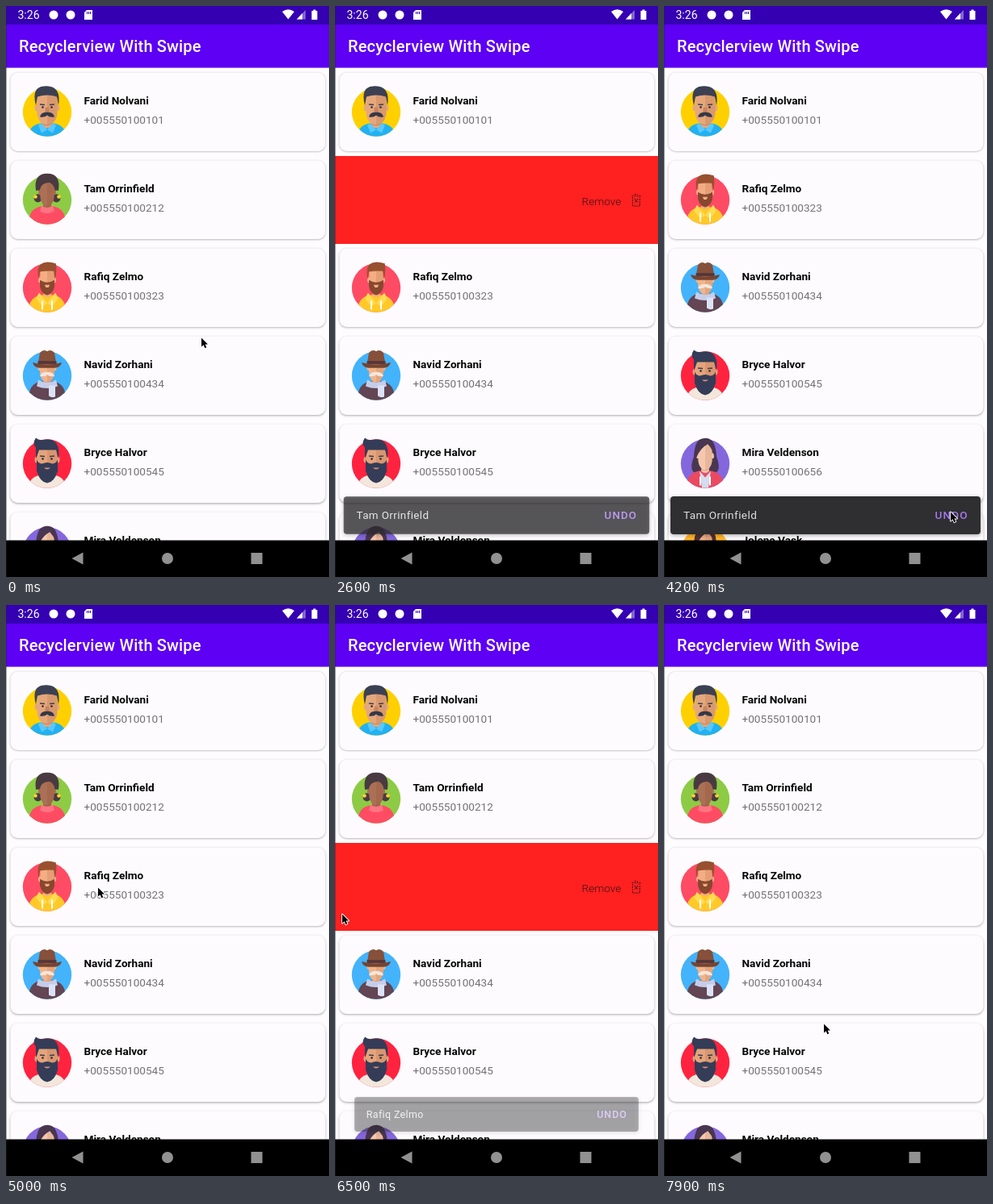
Write an HTML page with a canvas that moves like this. It is 400 by 708 pixels and loops after 8 s.

```html
<!DOCTYPE html>
<html lang="en">
<head>
<meta charset="utf-8">
<title>Swipe list</title>
<style>
html, body { margin: 0; width: 400px; height: 708px; overflow: hidden; background: #fefcff; }
canvas { display: block; }
</style>
</head>
<body>
<canvas id="stage" width="400" height="708"></canvas>
<script>
const ctx = document.getElementById('stage').getContext('2d');
const LOOP = 8000, STEP = 100, ROW = 109, TOP = 77, NAV = 662.5;

const clamp = v => Math.max(0, Math.min(1, v));
const smooth = v => { v = clamp(v); return v * v * (3 - 2 * v); };
const lerp = (a, b, v) => a + (b - a) * v;

function fill(color, d) {
  ctx.fillStyle = color;
  ctx.fill(new Path2D(d));
}
function line(color, width, d) {
  ctx.strokeStyle = color;
  ctx.lineWidth = width;
  ctx.stroke(new Path2D(d));
}
function rect(color, x, y, w, h) {
  ctx.fillStyle = color;
  ctx.fillRect(x, y, w, h);
}
function oval(color, x, y, rx, ry = rx) {
  ctx.fillStyle = color;
  ctx.beginPath();
  ctx.ellipse(x, y, rx, ry, 0, 0, Math.PI * 2);
  ctx.fill();
}
function round(color, x, y, w, h, r) {
  ctx.fillStyle = color;
  ctx.beginPath();
  ctx.roundRect(x, y, w, h, r);
  ctx.fill();
}
function text(str, x, y, color, weight = 400, size = 13.6, spacing = 0) {
  ctx.font = `${weight} ${size}px Roboto, sans-serif`;
  ctx.letterSpacing = spacing + 'px';
  ctx.fillStyle = color;
  ctx.fillText(str, x, y);
}
function shadow(color, blur, dy) {
  ctx.shadowColor = color;
  ctx.shadowBlur = blur;
  ctx.shadowOffsetY = dy;
}

// ---- avatars, drawn around the centre of a disc of radius 30 ----
function disc(color, body, neck = 14, behind) {
  oval(color, 0, 0, 30.2);
  ctx.save();
  ctx.beginPath();
  ctx.arc(0, 0, 30.2, 0, Math.PI * 2);
  ctx.clip();
  if (behind) behind();
  fill(body, `M-23 32Q-24 ${neck + 3}-8 ${neck}H8Q24 ${neck + 3} 23 32Z`);
  ctx.restore();
}
function head(skin, w = 12.5) {
  fill(skin, 'M-6 8H6V17Q0 23-6 17Z');
  fill('rgba(90,20,0,.2)', 'M-6 11H6V15Q0 19-6 15Z');
  oval(skin, -w - .5, -5, 2.5, 4);
  oval(skin, w + .5, -5, 2.5, 4);
  fill(skin, `M${-w}-23H${w}V3Q${w - 2} 15 0 16Q${2 - w} 15 ${-w} 3Z`);
  fill('rgba(110,30,0,.1)', `M0-23H${w}V3Q${w - 2} 15 0 16Z`);
}
function bust(paint) {
  ctx.save();
  ctx.translate(0, -5.5);
  ctx.scale(.82, .85);
  paint();
  ctx.restore();
}
function eyes(color) {
  oval('#2b2937', -5.5, -6, 1.3);
  oval('#2b2937', 5.5, -6, 1.3);
  line(color, 1.7, 'M-9-9.5L-3-9M3-9L9-9.5');
}
function strings() {
  line('#fff', 2, 'M-6 16V27M6 16V27');
}
function longHair(hair) {
  return () => fill(hair, 'M-13 11Q-20 8-14-9Q-13-32 0-32Q13-32 14-9Q20 8 13 11Z');
}
function fringe(hair) {
  fill(hair, 'M-14-1Q-19-31 1-31Q18-30 14-1Q13-13 4-22Q-7-17-14-1Z');
}

const faces = [
  () => {
    disc('#ffd000', '#22b1f2');
    head('#e5a77c');
    fill('#58c8fb', 'M-7 14L0 22L-7 26L-11 16ZM7 14L0 22L7 26L11 16Z');
    fill('#3c4053', 'M-14-8Q-20-31-4-32Q18-34 14-8L12-19Q0-23-12-19Z');
    eyes('#3c4053');
    fill('#c98560', 'M-2-6H2L3 0H-3Z');
    fill('#343848', 'M0 0Q8 0 9 6Q3 7 0 4Q-3 7-9 6Q-8 0 0 0Z');
  },
  () => {
    disc('#8dcb45', '#ff4c63', 8);
    bust(() => {
      oval('#493a42', -14, 4, 6);
      oval('#493a42', 14, 4, 6);
      head('#ab7056', 10.5);
      fill('#493a42', 'M-17-7Q-21-32 0-32Q21-32 17-7L11-8Q11-16 3-19Q-10-18-11-8Z');
    });
    oval('#ffd22d', -14.5, -4, 2.3);
    oval('#ffd22d', 14.5, -4, 2.3);
    fill('#ff7483', 'M-7 7Q0 12 7 7L9 14Q0 19-9 14Z');
  },
  () => {
    disc('#ff4b64', '#ffc928', 9);
    bust(() => {
      head('#f3ad82', 10.5);
      fill('#87482e', 'M-11-5Q0 2 11-5V5Q8 16 0 17Q-8 16-11 5Z');
      fill('#f3ad82', 'M-4 2H4L2 6H-2Z');
      fill('#98502f', 'M-13-6Q-16-23-10-28Q-2-34 13-29Q15-20 12-6L10-18Q0-19-11-17Z');
    });
    fill('#ffdc52', 'M-10 6L0 19L-6 23L-14 13ZM10 6L0 19L6 23L14 13Z');
    strings();
  },
  () => {
    disc('#43b3fb', '#634553', 7);
    bust(() => {
      head('#f0b48b', 11);
      fill('#f4e6dc', 'M0 1Q9 1 11 7Q3 8 0 5Q-3 8-11 7Q-9 1 0 1Z');
      fill('#86503a', 'M-14-10L-11-27Q-6-33 0-29Q6-33 11-27L14-10Z');
      fill('#53353a', 'M-14-15H14V-11H-14Z');
      fill('#754432', 'M-22-13Q0-7 22-13Q20-6 12-5H-12Q-20-6-22-13Z');
    });
    fill('#c5cdea', 'M-11 5Q0 12 11 5L13 13Q0 18-13 13Z');
    fill('#dce2f5', 'M2 12H10V26Q6 28 2 25Z');
  },
  () => {
    disc('#ff2340', '#f3e7dc');
    head('#e5a47b');
    fill('#343c57', 'M-13-5Q-11 0-6 0Q0-3 6 0Q11 0 13-5V9Q9 23 0 24Q-9 23-13 9Z');
    fill('#dc8e76', 'M-4 5H4Q0 9-4 5Z');
    fill('#343c57', 'M-14-6L-14-20Q-19-25-14-32Q-10-28-2-30Q17-32 14-6L11-17H-10Z');
    eyes('#343c57');
  },
  () => {
    disc('#8567dd', '#eb4961', 9, longHair('#493650'));
    bust(() => {
      head('#f6c7ad', 10.5);
      fringe('#493650');
    });
    fill('#d6dced', 'M-7 9L0 17L7 9L4 30H-4Z');
    strings();
  },
  () => {
    disc('#ffb629', '#31a6c9', 9, longHair('#503034'));
    bust(() => {
      head('#efb08a', 10.5);
      fringe('#503034');
    });
  }
];

const people = [
  ['Farid Nolvani', '+005550100101'],
  ['Tam Orrinfield', '+005550100212'],
  ['Rafiq Zelmo', '+005550100323'],
  ['Navid Zorhani', '+005550100434'],
  ['Bryce Halvor', '+005550100545'],
  ['Mira Veldenson', '+005550100656'],
  ['Jolene Vask', '+005550100767']
];

// ---- timeline ----
const swipes = [
  { row: 1, grab: 1500, release: 2200, out: 2490, undo: 4425 },
  { row: 2, grab: 5520, release: 6170, out: 6447, undo: 7325 }
];
const pointer = [
  [0, 242, 411], [500, 240, 390], [1000, 238, 320], [1400, 251, 242], [1500, 251, 242],
  [2200, -14, 252], [2700, -14, 300], [3400, 232, 389], [4150, 355, 627],
  [4500, 355, 627], [5000, 114, 350], [5400, 268, 354], [5520, 268, 354],
  [6170, 9, 383], [6600, 9, 383], [7150, 355, 627], [7400, 355, 627],
  [7900, 198, 519], [8000, 198, 519]
];

function pointerAt(t) {
  let i = 1;
  while (i < pointer.length - 1 && pointer[i][0] < t) i++;
  const [t0, x0, y0] = pointer[i - 1], [t1, x1, y1] = pointer[i];
  const v = smooth((t - t0) / (t1 - t0));
  return [lerp(x0, x1, v), lerp(y0, y1, v)];
}

function dragAt(s, t) {
  if (t < s.grab) return 0;
  const start = pointerAt(s.grab)[0];
  const held = pointerAt(Math.min(t, s.release))[0] - start;
  return lerp(held, -400, smooth((t - s.release) / (s.out - s.release)));
}

// ---- parts of the screen ----
function card(i, dx, y, alpha = 1) {
  if (alpha <= 0 || y > NAV) return;
  ctx.save();
  ctx.globalAlpha = alpha;
  ctx.translate(dx, y);
  const depth = y / NAV;
  shadow('rgba(0,0,0,.32)', 2.2 + depth, .3 + 1.2 * depth);
  round('#fdfbfe', 5.5, 5.5, 390, 97.5, 9);
  shadow('transparent', 0, 0);
  text(people[i][0], 96.5, 45, '#050505', 700);
  text(people[i][1], 96.5, 69, '#747274');
  ctx.translate(51, 54.5);
  faces[i]();
  ctx.restore();
}

function removePanel(dx, y) {
  ctx.save();
  ctx.beginPath();
  ctx.rect(400 + dx, y, -dx, ROW);
  ctx.clip();
  rect('#ff2020', 0, y, 400, ROW);
  text('Remove', 305.5, y + 61, '#401212', 300);
  ctx.translate(373, y + 55);
  ctx.setLineDash([2, 1]);
  line('#4a1616', 1.1, 'M-4.5-4V7H4.5V-4M-5.5-5.5H5.5M-2-7.5H2M-2-2L2 3M2-2L-2 3');
  ctx.restore();
}

function list(t) {
  const s = t < 5000 ? swipes[0] : swipes[1];
  const undone = t >= s.undo;
  const closed = undone
    ? 1 - smooth((t - s.undo) / 250)
    : smooth((t - s.out - 120) / 250);
  ctx.save();
  ctx.beginPath();
  ctx.rect(0, 0, 400, NAV + 1);
  ctx.clip();
  const y = TOP + s.row * ROW;
  const dx = undone ? 0 : dragAt(s, t);
  if (dx < 0 && t < s.out + 120) removePanel(dx, y);
  people.forEach((_, i) => {
    if (i === s.row) card(i, dx, y, undone ? clamp((t - s.undo - 250) / 120) : 1);
    else card(i, 0, TOP + (i - (i > s.row ? closed : 0)) * ROW);
  });
  snackbar(s, t);
  ctx.restore();
}

function snackbar(s, t) {
  const shown = clamp((t - s.out) / 150);
  const alpha = Math.min(shown, 1 - clamp((t - s.undo) / 75));
  if (alpha <= 0) return;
  const scale = .8 + .2 * (1 - (1 - shown) ** 2);
  // the bar fades as one layer, so its labels pale towards the page
  const pale = (...rgb) => `rgb(${rgb.map(c => lerp(252, c, alpha))})`;
  ctx.save();
  ctx.translate(200, 631.5);
  ctx.scale(scale, scale);
  ctx.globalAlpha = alpha;
  shadow('rgba(0,0,0,.32)', 5, 1.5);
  round('#2f2e30', -192, -23.5, 384, 47, 4);
  shadow('transparent', 0, 0);
  ctx.globalAlpha = 1;
  text(people[s.row][0], -176, 4.7, pale(223, 221, 224), 400, 13.6, .4);
  text('UNDO', 135.5, 4.7, pale(164, 119, 238), 500, 13.6, 1.1);
  ctx.restore();
}

function bars() {
  rect('#5d00f3', 0, 23, 400, 53.6);
  rect('#3400b2', 0, 0, 400, 23);
  text('Recyclerview With Swipe', 16, 57, '#fff', 500, 20, .16);
  text('3:26', 14.5, 16.3, '#fff', 400, 14);
  oval('#fff', 59, 11, 5.5);
  oval('#fff', 80, 11, 5.5);
  fill('#fff', 'M100 5H107V17H97V8Z');
  line('#3400b2', 1, 'M100.5 7V10M102.5 7V10M104.5 7V10');
  fill('#fff', 'M342 7Q349.5 1.5 357 7L349.5 16.5Z');
  fill('rgba(255,255,255,.4)', 'M371 5V16.5H360Z');
  fill('#fff', 'M367 9V16.5H360Z');
  fill('#fff', 'M378.5 6H380.5V4.5H383.5V6H385.5V17H378.5Z');

  rect('#000', 0, NAV, 400, 46);
  fill('#919191', 'M81.5 685L95.5 677.5V692.5Z');
  oval('#919191', 200, 685, 7);
  rect('#919191', 303.5, 678, 14, 14);
  rect('rgba(45,38,50,.5)', 0, 0, .8, 708);
}

function cursor(t) {
  const [x, y] = pointerAt(t);
  ctx.save();
  ctx.translate(x, y);
  ctx.lineJoin = 'round';
  const arrow = 'M0 .5V11.5L2.6 9.2L4.4 13.2L6.3 12.3L4.6 8.5H8Z';
  line('#fff', 1.8, arrow);
  fill('#000', arrow);
  ctx.restore();
}

function draw(now) {
  const t = Math.floor((now % LOOP) / STEP) * STEP;
  rect('#fefcff', 0, 0, 400, 708);
  list(t);
  bars();
  cursor(t);
}

let begin = null;
function tick(now) {
  if (begin === null) begin = now;
  draw(now - begin);
  requestAnimationFrame(tick);
}
draw(0);
requestAnimationFrame(tick);
</script>
</body>
</html>
```
